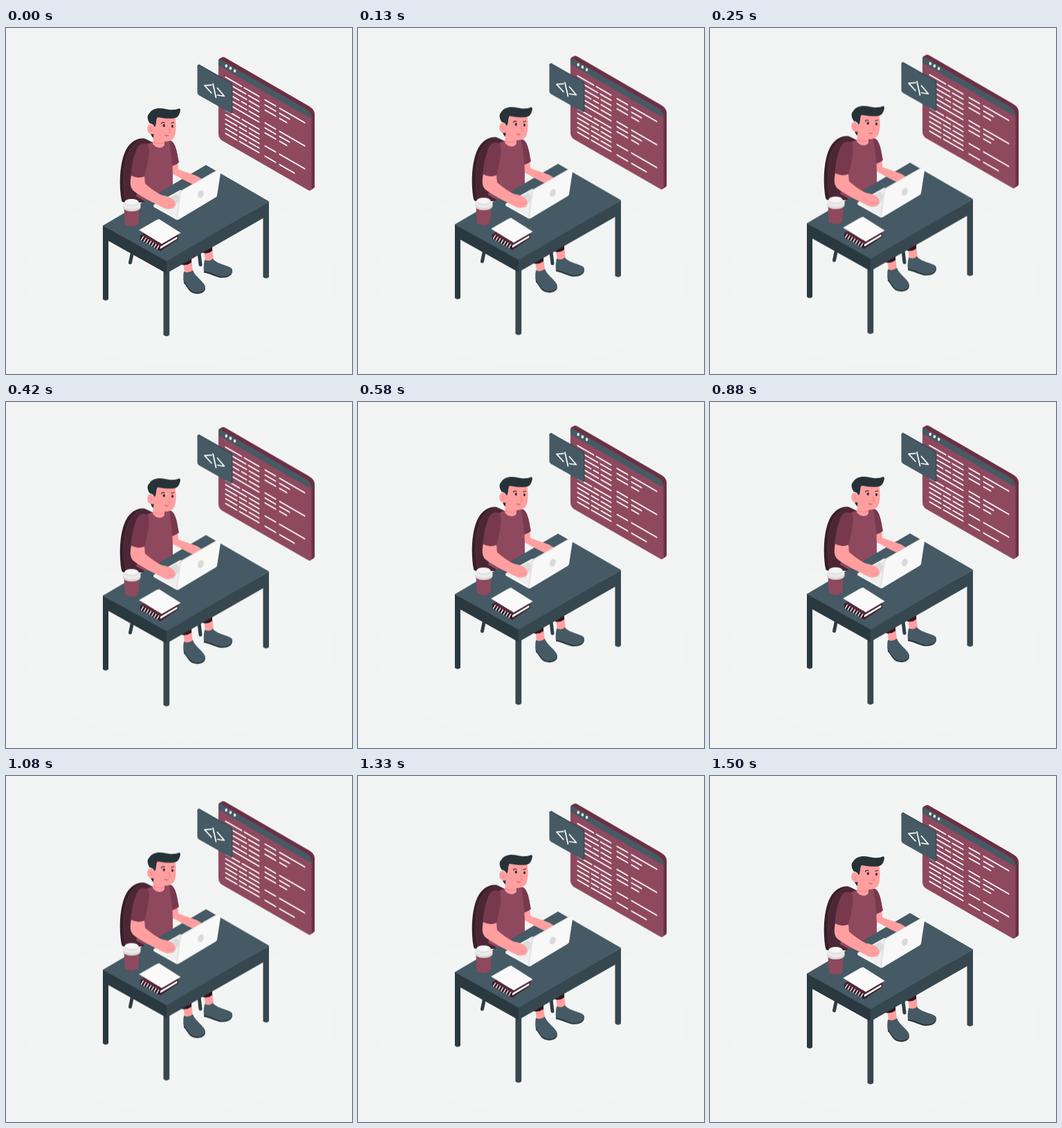
An HTML page for the animation above (1.54 s loop, 500 by 500 pixels).

```html
<!DOCTYPE html>
<html lang="en">
<head>
<meta charset="utf-8">
<title>Developer at a desk</title>
<style>
  html, body { margin: 0; width: 100%; height: 100%; overflow: hidden; background: #f2f4f4; }
  svg { display: block; width: 100vw; height: 100vh; }
  .scene { animation: float 1540ms linear infinite; }
  @keyframes float {
    0%, 97.4%, 100% { transform: translateY(0); }
    48% { transform: translateY(-10px); }
  }
  .line { fill: none; stroke-linecap: round; stroke-linejoin: round; }
  .wine { fill: #8f495f; }
  .wine-dark { fill: #78394e; }
  .plum { fill: #3a1f2a; }
  .slate { fill: #455a64; }
  .slate-mid { fill: #37474f; }
  .slate-dark { fill: #2a383f; }
  .ink { fill: #263238; }
  .skin { fill: #ff9f9f; }
</style>
</head>
<body>
<svg viewBox="0 0 500 500">
  <ellipse cx="250" cy="360" rx="223" ry="127" fill="#f3f5f5"/>

  <g class="scene">
    <!-- code window -->
    <g>
      <path fill="#6b3044" d="M307 47Q307 45 309 44L313 42Q315 41.500 317 43L438 113Q446 118 446 124V229Q446 231 444 232L439 235L420 220L309 60Z"/>
      <path class="wine" d="M307 48Q307 44.500 311 46.500L433 117Q441.500 122 441.500 131V231Q441.500 236 437 234.500L312 162.500Q307 159 307 153Z"/>
      <path class="slate" d="M307 54V48Q307 44.500 311 46.500L433 117Q441.500 122 441.500 131.500Z"/>
      <g fill="#fff">
        <ellipse cx="318.300" cy="54.700" rx="1.700" ry="2.200"/>
        <ellipse cx="324.400" cy="58.300" rx="1.700" ry="2.200"/>
        <ellipse cx="330.600" cy="62" rx="1.700" ry="2.200"/>
      </g>
      <path class="line" stroke="#fff" stroke-width="2" transform="translate(317.500 71) skewY(30)"
        d="M0 0h23m4 0h21 M0 7.400h29m4 0h15 M8 14.800h22m4 0h14 M8 22.200h11m4 0h7m4 0h14
           M8 29.600h22m4 0h14 M8 37h40 M0 47.400h20m4 0h24 M0 54.200h30m4 0h14
           M0 61h16m4 0h10m4 0h14 M0 67.800h16m4 0h28 M0 74.600h16m4 0h10m4 0h14 M0 81.400h16m4 0h28
           M57 0h15m6 0h36 M57 7.400h15m6 0h14 M57 14.800h15m6 0h10
           M57 33.400h15m6 0h36 M57 40.600h15m6 0h14 M57 47.800h15m6 0h10
           M57 66.500h15m6 0h36 M57 81.400h15m6 0h21"/>
    </g>

    <!-- code tag -->
    <path class="slate-mid" d="M276.500 56Q276.500 53 279 52.500L325.500 79Q327.500 80.500 327.500 83V121Q327.500 123.500 325 123.500L300 90Z"/>
    <path class="slate" d="M276.500 55Q276.500 52.500 279 54L324 79.500Q326 81 326 83.500V121Q326 124 323.500 122.500L278.500 97Q276.500 95.500 276.500 93Z"/>
    <path class="line" stroke="#fff" stroke-width="1.700" d="M297 82.300L287 83.200L297 94M299 80.500L303.500 100.500M305.500 86.700L315.500 98.500L305.500 97"/>

    <!-- chair -->
    <path class="line" stroke="#2f3e45" stroke-width="5" d="M183 322L179.500 339M279 325L281 342"/>
    <path class="plum" d="M167 249C163 226 164 193 174 175C181 163 192 158 201 160L213 166L205 252H176Q168 253 167 249Z"/>
    <path fill="#4b2736" d="M173 249C168 226 169 193 179 176C186 165 195 160 203 161L213 166L205 252Z"/>
    <path class="line" stroke="#63394a" stroke-width=".6" d="M173 249C168 226 169 193 179 176C185 166 193 161 201 161"/>

    <!-- feet -->
    <path class="skin" d="M256 338L268 333L270 352Q264 356 258 353ZM286 322L298 316L300 336Q294 339 288 337Z"/>
    <path fill="#2c1721" d="M252 334L268 326V339Q261 344 254 342ZM283 318L298 310V322Q292 327 285 325Z"/>
    <path class="ink" d="M256.500 362L257 369C261 372 263 380 270 383C278 386 288 383 288 376ZM286 350V353.500C296 355 302 360 311 361C320 361 328 358 327 350Z"/>
    <path class="slate" d="M257 352Q264 355 270 350C273 359 286 366 288 374C288 382 276 384 270 381C263 377 262 372 257 366Q255.500 360 257 352ZM287 335Q294 338 299 333.500C305 342 325 343 327 349C328 357 318 360 310 359C302 357 296 353 286 351.500Q285 345 287 335Z"/>

    <!-- torso -->
    <path class="wine" d="M203 169C211 163 232 162 239 163C246 168 248 184 249 193L241 200V232L204 252L188 243L198 214Z"/>
    <path class="wine-dark" d="M236 163C245 163 247 180 250 194Q246 199 240.500 200Q239 180 236 163Z"/>

    <!-- head -->
    <path class="ink" d="M208 150H215V160Q210 158 208 150Z"/>
    <path class="skin" d="M213 131C220 126 236 127 244 128C247 140 245.500 152 243 158C240 163 233 164.500 229 164V169C226 175 216 174 212 167L213.500 153C207 155 203 149 204.500 143C206 138 211 138 213 142Z"/>
    <path class="ink" d="M208 138C204 133 203.500 126 207 123.500C210 118 216 116 222 116C229 116 235 119 241 118Q247 118 250 116Q253 117 251.500 121Q250 128 245 130C237 132 226 130 219 129C216 133 218 139 215 143Q212 138 208 138Z"/>
    <path class="line" stroke="#f07f85" stroke-width=".9" d="M213 165Q220 169 229 166M235.500 145L237.500 151L235 151.500M208 144Q210 145 210 149"/>
    <g class="ink">
      <ellipse cx="228.300" cy="141" rx="1.700" ry="2"/>
      <ellipse cx="240.500" cy="142" rx="1.600" ry="2"/>
    </g>
    <path class="line" stroke="#263238" stroke-width="1.300" d="M224.500 138Q226.500 135.500 229 137M239 137.500L242.500 136.500"/>
    <path class="line" stroke="#b94c5d" stroke-width="1" d="M229.500 155Q232 157 234.500 155.500"/>

    <!-- desk -->
    <path class="slate-dark" d="M140 298L148 302V392Q144 395.500 140 392Z"/>
    <path class="slate-mid" d="M371.500 270L380 265V360Q376 363.500 371.500 360Z"/>
    <path class="slate-mid" d="M227.500 349H236.200V443.500Q232 447.500 227.500 443.500Z"/>
    <path class="slate-mid" d="M140 285.500L232 335L380 250.500V270L232 354.500L140 303Z"/>
    <path class="slate-dark" d="M140 285.500L232 336V354.500L140 303Z"/>
    <path class="slate" d="M140 285.500L289 198L380 250.500L232 337Z"/>

    <!-- far arm -->
    <path class="skin" d="M240.500 199.500L248.500 196L249 204C257 208 271 211 278 215L287 221L278 230L266 224C257 220 246 213 241 211Z"/>

    <!-- laptop -->
    <path fill="#d6d6d6" d="M213.500 255.500L252 234L262 250L247 277.500L213.500 258.500Z"/>
    <path fill="#efefef" d="M213.500 255.500L252 234L262 250L247.500 274.500Z"/>
    <path fill="#dcdcdc" d="M222 253L246 239.500L252 246L242 262Z"/>
    <path fill="#fafafa" d="M213.500 255.500L247.500 274.500V277.500L213.500 258.500Z"/>
    <path fill="#e2e2e2" d="M251 237Q251.500 235.500 253 234.800L308 203.500L310 205L254 238L248.500 277L246 275.500Z"/>
    <path fill="#f8f8f8" d="M253 238.500Q253.300 236.500 255 235.500L308 204.500Q311 203.500 310.500 206.500L305 242Q304.700 243.800 303 244.800L250 276.500Q247.500 278 247.800 275.500Z"/>
    <ellipse cx="281.500" cy="240" rx="4.200" ry="5.800" fill="#dadada" transform="rotate(22 281.500 240)"/>

    <!-- near arm -->
    <path class="skin" d="M181 212L200 214L201 225C209 232 218 238 226 242C234 243 242 246 244 251Q247 256 241 260Q236 263 230 261C222 257 214 253 206 249C198 244 188 239 183 234C178 228 180 219 181 212Z"/>
    <path class="line" stroke="#f3858a" stroke-width=".8" d="M234 255Q239 258 243 255M226 242Q230 242 234 244"/>
    <path class="wine-dark" d="M188 177C191 167 201 164 206 171C208 186 203 203 200 214.500Q190 218.500 180.500 213C181 200 184 188 188 177Z"/>

    <!-- cup -->
    <path class="wine" d="M170.500 260L172 284Q181.500 290 191 284L193 260Z"/>
    <path fill="#dadada" d="M169 255V260Q172 265 181.500 265Q192 265 194.500 260V255Z"/>
    <ellipse cx="181.700" cy="255.500" rx="12.700" ry="6.500" fill="#ebebeb"/>
    <path fill="#e0e0e0" d="M171.500 251V255Q181 261 191.500 255V251Z"/>
    <ellipse cx="181.500" cy="251.300" rx="10" ry="4.300" fill="#f5f5f5"/>

    <!-- notebook and sheets -->
    <path class="plum" d="M194 300L222 283L249 300V305L223 322.500L194 306Z"/>
    <path fill="#fff" d="M223 316L247.500 301.500V304.500L223 319.300Z"/>
    <path fill="#53283a" d="M195 300L222 284L249 299.500L223 315.500Z"/>
    <path class="line" stroke="#fff" stroke-width="6.500" stroke-dasharray="1.300 3" style="stroke-linecap:butt" d="M196.500 303.500L222 318.500"/>
    <path fill="#e3e3e3" d="M192 292L218 277L246 295.500L220 309Z"/>
    <path fill="#fafafa" d="M194 291.500L221 276L252.500 296L225 312Z"/>
  </g>
</svg>
</body>
</html>
```
